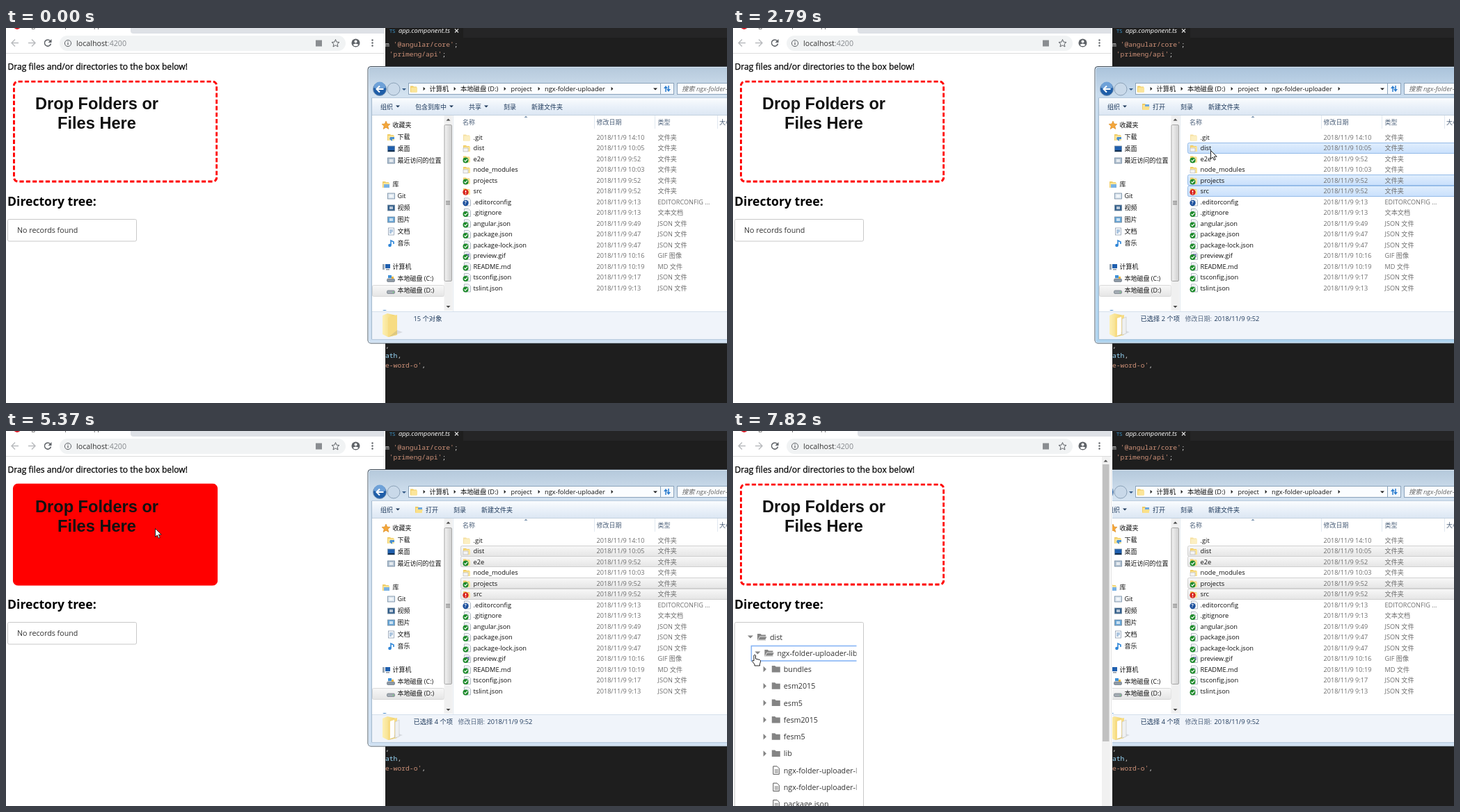
Write an HTML page that moves like this. It is 1036 by 540 pixels and loops after 8000 ms.

```html
<!DOCTYPE html>
<html lang="zh-CN">
<head>
<meta charset="utf-8">
<title>Folder upload</title>
<style>
html, body { margin: 0; width: 100%; height: 100%; overflow: hidden; background: #fff; }
svg { display: block; width: 1036px; height: 540px; }
text { font: 9.3px "Open Sans", "Noto Sans CJK SC", "Noto Sans CJK", sans-serif; white-space: pre; }
.small { font-size: 9.15px; fill: #6d6d6d; }
.nav { font-size: 9px; }
.page { font-size: 10.7px; fill: #333; }
.italic { font-style: italic; }
.code { font: 9.7px "Noto Sans Mono", monospace; }
.drop { font: bold 23.6px "Liberation Sans", Arial, sans-serif; text-anchor: middle; fill: #111; }
.zone { box-sizing: border-box; width: 380px; height: 190px; border: 4px dashed #f00; border-radius: 10px; }
.zone.over { background: #f00; border-style: solid; }
</style>
</head>
<body>
<svg id="stage" viewBox="0 0 1036 540">
  <defs>
    <linearGradient id="sel" x2="0" y2="1"><stop stop-color="#e0eefd"/><stop offset="1" stop-color="#c9e0fc"/></linearGradient>
    <linearGradient id="hover" x2="0" y2="1"><stop stop-color="#fbfdff"/><stop offset="1" stop-color="#ebf4fe"/></linearGradient>
    <linearGradient id="idle" x2="0" y2="1"><stop stop-color="#f8f8f8"/><stop offset="1" stop-color="#e5e5e5"/></linearGradient>
    <linearGradient id="bar" x2="0" y2="1"><stop stop-color="#fafcfe"/><stop offset=".5" stop-color="#eaf1f9"/><stop offset="1" stop-color="#dce7f3"/></linearGradient>
    <linearGradient id="tip" x2="0" y2="1"><stop stop-color="#fff"/><stop offset="1" stop-color="#e4e5f0"/></linearGradient>
    <linearGradient id="thumb"><stop stop-color="#f3f3f3"/><stop offset="1" stop-color="#cfcfcf"/></linearGradient>
    <linearGradient id="glassOn" x2="0" y2="1"><stop stop-color="#a9c2da"/><stop offset=".1" stop-color="#c9dcee"/><stop offset="1" stop-color="#acd2ee"/></linearGradient>
    <linearGradient id="glassOff" x2="0" y2="1"><stop stop-color="#b4c8db"/><stop offset=".1" stop-color="#d3e2f0"/><stop offset="1" stop-color="#cfe0f2"/></linearGradient>
    <linearGradient id="gold"><stop stop-color="#fdf0b4"/><stop offset="1" stop-color="#f0cf62"/></linearGradient>
    <linearGradient id="ghost" x2="0" y2="1"><stop stop-color="#f4fbfe"/><stop offset="1" stop-color="#d8eefa"/></linearGradient>
    <clipPath id="behind"><path d="M545 0H1036V540H545Z"/></clipPath>
    <clipPath id="treeClip"><path d="M12 280H177.5V540H12Z"/></clipPath>
    <clipPath id="navClip"><path d="M526 126H642V407H526Z"/></clipPath>
  </defs>
  <g id="scene"></g>
</svg>
<script>
const LOOP = 8000;

// Pointer stops: time, x, y
const pointerStops = [
  [600, 700, 440], [680, 700, 330], [760, 698, 272], [920, 697, 234], [1080, 697, 225],
  [1230, 696, 225], [1540, 694, 221], [1620, 692, 219], [1930, 691, 219], [2090, 690, 231],
  [2240, 689, 234], [2550, 689, 214], [2630, 688, 194], [2710, 686, 176], [3330, 688, 179],
  [3410, 691, 176], [3640, 691, 175], [3800, 691, 183], [4110, 692, 183], [4270, 692, 179],
  [4430, 698, 175], [4740, 600, 176], [4820, 488, 176], [4980, 320, 158], [5060, 214, 140],
  [5690, 220, 180], [5770, 232, 240], [5840, 240, 275], [6000, 246, 297], [6160, 160, 306],
  [6240, 98, 310], [6400, 60, 300], [6480, 37, 293], [6640, 25, 296], [7270, 26, 305],
  [7350, 27, 313], [7660, 31, 322]
];

// State changes, applied in order of time
const changes = [
  [0, { selected: [], bar: 'none', info: 'empty', press: false, active: false, expanded: 0, focus: -1 }],
  [1380, { press: true, active: true }],
  [1460, { selected: ['projects'] }],
  [1540, { press: false, bar: 'one', info: 'one' }],
  [2240, { press: true }],
  [2320, { selected: ['projects', 'src'] }],
  [2400, { press: false, bar: 'many', info: 2 }],
  [2710, { press: true }],
  [2790, { press: false, selected: ['dist', 'projects', 'src'] }],
  [3100, { info: 3 }],
  [3880, { tooltip: true }],
  [4030, { tooltip: false }],
  [4110, { press: true, selected: ['dist', 'e2e', 'projects', 'src'] }],
  [4270, { info: 4 }],
  [4740, { drag: true }],
  [5060, { over: true }],
  [5370, { drag: false, press: false, active: false }],
  [5450, { over: false }],
  [5530, { tree: true }],
  [5610, { behind: true }],
  [6480, { hand: true }],
  [6880, { expanded: 1, focus: 0 }],
  [7660, { focus: 1 }],
  [7740, { expanded: 2 }]
];

const files = [
  ['.git', '14:10', '文件夹', 'pale'], ['dist', '10:05', '文件夹', 'folder'], ['e2e', '9:52', '文件夹', 'folder ok'],
  ['node_modules', '10:03', '文件夹', 'folder'], ['projects', '9:52', '文件夹', 'folder ok'], ['src', '9:52', '文件夹', 'folder bad'],
  ['.editorconfig', '9:13', 'EDITORCONFIG ...', 'doc new'], ['.gitignore', '9:13', '文本文档', 'doc ok'],
  ['angular.json', '9:49', 'JSON 文件', 'doc ok'], ['package.json', '9:47', 'JSON 文件', 'doc ok'],
  ['package-lock.json', '9:47', 'JSON 文件', 'doc ok'], ['preview.gif', '10:16', 'GIF 图像', 'image ok'],
  ['README.md', '10:19', 'MD 文件', 'doc ok'], ['tsconfig.json', '9:17', 'JSON 文件', 'doc ok'], ['tslint.json', '9:13', 'JSON 文件', 'doc ok']
];
const ROW = 15.5, ROW_TOP = 149.7;

const rect = (x, y, w, h, fill, more = '') => `<rect x="${x}" y="${y}" width="${w}" height="${h}" fill="${fill}" ${more}/>`;
const circle = (x, y, r, fill, more = '') => `<circle cx="${x}" cy="${y}" r="${r}" fill="${fill}" ${more}/>`;
const shape = (d, fill, more = '') => `<path d="${d}" fill="${fill}" ${more}/>`;
const line = (d, color, width = 1) => `<path d="${d}" fill="none" stroke="${color}" stroke-width="${width}"/>`;
// y is the middle of the line of text
const text = (x, y, s, fill = '#111', more = '') => `<text x="${x}" y="${y + 3.4}" fill="${fill}" ${more}>${s}</text>`;
const small = (x, y, s) => `<text class="small" x="${x}" y="${y + 3.3}">${s}</text>`;
const at = (x, y, s) => `<g transform="translate(${x} ${y})">${s}</g>`;
const down = (x, y, fill = '#1e395b', r = 3) => shape(`M${x - r} ${y - r / 2}h${2 * r}l${-r} ${r}z`, fill);
const right = (x, y, fill = '#222', r = 2.5) => shape(`M${x - r / 2} ${y - r}v${2 * r}l${r} ${-r}z`, fill);

const folder = (x, y) => at(x, y, shape('M-5-4h4l1 1h4v8h-9z', '#f0cc63') + shape('M-4-2h9v7h-9z', '#fbe59a'));
const openIcon = (x, y) => folder(x, y) + rect(x - 1, y - 3, 6, 5, '#6fa8dc') + shape(`M${x - 5} ${y + 5}l2-5h9l-2 5z`, '#fbe08a');

function fileIcon(x, y, kind) {
  let s = '';
  if (kind === 'pale') return `<g opacity=".6">${folder(x, y)}</g>`;
  if (kind.startsWith('folder')) s = folder(x, y) + (kind === 'folder' ? rect(x - 5, y, 7, 5, '#f4f4f4', 'stroke="#b7b7b7" stroke-width=".7"') : '');
  else s = shape(`M${x - 3.5} ${y - 5.5}h6l3 3v8h-9z`, '#fff', 'stroke="#9aa5b1" stroke-width=".8"')
    + (kind.startsWith('image') ? rect(x - 2, y - 3, 6, 5, '#8e8fc0') : line(`M${x - 2} ${y - 2.5}h5M${x} ${y - .5}h4`, '#b9c6d3', .8));
  if (kind.endsWith('ok')) s += circle(x - 1.5, y + 2, 4, '#1d8a2b') + line(`M${x - 3.5} ${y + 2}l1.5 1.7 3-3.4`, '#fff', 1.2);
  if (kind.endsWith('bad')) s += circle(x - 1.5, y + 1.5, 4.2, '#d8231c') + line(`M${x - 1.5} ${y - 1}v3m0 1v1.2`, '#fff', 1.4);
  if (kind.endsWith('new')) s += circle(x - 1.5, y + 1.5, 4.2, '#1b4f9c') + `<text x="${x - 3.4}" y="${y + 4}" fill="#fff" style="font-size:7px;font-weight:700">?</text>`;
  return s;
}

function editor() {
  const code = (y, parts) => `<text class="code" x="545" y="${y}">${parts.map(([s, c]) => `<tspan fill="${c}">${s}</tspan>`).join('')}</text>`;
  const string = '#ce9178', plain = '#d4d4d4';
  return rect(543, 0, 493, 540, '#1e1e1e') + rect(657, 0, 379, 14, '#252526')
    + text(551, 4, 'TS', '#3f9fd8', 'style="font-size:7.5px"') + text(564, 4, 'app.component.ts', '#fff', 'class="italic"')
    + line('M645 1.5l5 5m0-5l-5 5', '#ddd', 1.2)
    + code(27, [['m ', plain], ["'@angular/core'", string], [';', plain]])
    + code(41, [[" 'primeng/api'", string], [';', plain]])
    + code(461, [[',', plain]]) + code(475, [['ath', '#9cdcfe'], [',', plain]]) + code(489, [["e-word-o'", string], [',', plain]]);
}

function treeRows(s) {
  const lib = 'ngx-folder-uploader-lib';
  const rows = [['dist', 0, s.expanded > 0]];
  if (s.expanded > 0) rows.push([lib, 1, s.expanded > 1]);
  if (s.expanded > 1) {
    ['bundles', 'esm2015', 'esm5', 'fesm2015', 'fesm5', 'lib'].forEach(n => rows.push([n, 2]));
    [lib + '.d.ts', lib + '.metadata.json', 'package.json'].forEach(n => rows.push([n, 2, false, true]));
  }
  ['e2e', 'projects', 'src'].forEach(n => rows.push([n, 0]));
  return rows;
}

function tree(s) {
  let y = 297, last = y, out = '';
  treeRows(s).forEach(([name, depth, open, file], i) => {
    const x = depth * 10.4, gray = '#848484';
    if (file) out += shape(`M${x + 37} ${y - 6}h5.5l3 3v8.5h-8.5z`, '#fff', 'stroke="#555"') + line(`M${x + 39} ${y - 1}h5m-5 2h5m-5 2h5`, '#555', .8);
    else {
      out += open ? down(x + 25, y - .5, gray, 4) : right(x + 25, y, gray, 4.3);
      out += shape(`M${x + 35} ${y - 5}h4.5l1.5 1.5h6v8h-12z`, gray);
      if (open) out += shape(`M${x + 36} ${y + 3.5}l2.5-4.5h10.5l-2.5 5h-11z`, gray, 'stroke="#fff" stroke-width=".8"');
    }
    out += text(x + (open ? 53 : 52), y + .5, name, '#333', 'class="page"');
    if (s.focus === i) out += rect(x + 16, y - 10.5, 170, 21.5, 'none', 'stroke="#86b4f5" stroke-width="1.6"');
    last = y;
    y += open ? 23 : 24.3;
  });
  const scroll = s.expanded ? 13 : 0;
  if (scroll) out += rect(13, last + 11.5, 165, 12, '#f1f1f1') + rect(25, last + 13.5, 128, 8, '#c1c1c1')
    + right(172, last + 17.5, '#505050', 3) + shape(`M17 ${last + 17.5}l3-3v6z`, '#a3a3a3');
  return rect(2.5, 275.5, 185, last - 254 + scroll, '#fff', 'rx="2" stroke="#c8c8c8"') + `<g clip-path="url(#treeClip)">${out}</g>`;
}

const dropZone = over => `<foreignObject width="380" height="190" transform="translate(9.8 75.4) scale(.775)">
  <div xmlns="http://www.w3.org/1999/xhtml" class="zone${over ? ' over' : ''}"></div></foreignObject>`;

function browser(s) {
  const icon = '#5f6368', pale = '#b9bbbe';
  let out = rect(0, 0, 545, 540, '#fff') + rect(0, 0, 543, 8, '#dee1e6') + shape('M0 0H179V4q0 4 4 4H0Z', '#fff')
    + circle(16, -3, 5, '#dd1b26') + text(31, -3.5, 'ngx-folder-uploader-app', '#444')
    + rect(77, 11, 411, 22, '#f1f3f4', 'rx="11"')
    + line('M18 21.5H8M13 16.5l-5 5 5 5M32 21.5h10M37 16.5l5 5-5 5', pale, 1.4)
    + line('M63.5 18.5a4.6 4.6 0 1 0 1 4', icon, 1.5) + shape('M65.5 16v5h-5z', icon)
    + circle(89, 22, 4.6, 'none', `stroke="${icon}"`) + line('M89 21v3.5M89 19v1', icon, 1.2)
    + '<text class="page" x="101" y="25.5">localhost<tspan fill="#85888c">:4200</tspan></text>'
    + rect(445, 17.5, 9, 9, '#8a8d91')
    + shape('M473.5 16.5l1.5 3.7 4 .3-3 2.6 1 3.9-3.5-2.1-3.5 2.1 1-3.9-3-2.6 4-.3z', 'none', `stroke="${icon}"`)
    + circle(502.5, 21.5, 6, icon) + circle(502.5, 19.5, 2, '#fff') + shape('M498.5 24q4-3 8 0l-2 2h-4z', '#fff')
    + [17.5, 21.5, 25.5].map(y => circle(526.5, y, 1.2, icon)).join('')
    + rect(0, 36, 543, 1, '#dcdcdc') + rect(543, 0, 1, 540, '#e4e4e4')
    + text(2.5, 56.7, 'Drag files and/or directories to the box below!', '#000', 'style="font-size:12.15px" stroke="#000" stroke-width=".25"');
  out += dropZone(s.over)
    + '<text class="drop" x="130.5" y="116.5">Drop Folders or</text><text class="drop" x="130.5" y="144.5">Files Here</text>'
    + text(2, 252.5, 'Directory tree:', '#000', 'style="font-size:17.6px;font-weight:700"');
  out += s.tree ? tree(s) : rect(2.5, 275.5, 185, 31.5, '#fff', 'rx="2" stroke="#c8c8c8"') + text(16, 291.5, 'No records found', '#333', 'class="page"');
  if (s.expanded > 1) out += rect(530, 37, 12, 503, '#f1f1f1') + rect(531, 48, 9.5, 399, '#c1c1c1') + shape('M532.5 44.5h6l-3-3z', '#505050');
  return out;
}

function commands(kind) {
  const ink = '#1e395b';
  const item = (x, s, arrow) => text(x, 113.5, s, ink, 'class="nav"') + (arrow ? down(arrow, 113, ink) : '');
  const shift = kind === 'one' ? 55 : 0;
  let out = item(538, '组织', 563);
  if (kind !== 'none') out += openIcon(593, 113) + item(603, '打开');
  if (kind === 'many') return out + item(643, '刻录') + item(683, '新建文件夹');
  return out + item(588 + shift, '包含到库中', 640 + shift) + item(665 + shift, '共享', 690 + shift)
    + item(715 + shift, '刻录') + item(755 + shift, '新建文件夹');
}

function navIcon(label, color, y) {
  if (label === '音乐') return line(`M553 ${y + 3}v-7l4 2v3`, color, 1.6) + circle(551.5, y + 3, 2.3, color);
  if (label === '下载') return folder(553, y) + shape(`M552 ${y}h6v3h-3v3l-4-3z`, color);
  if (label === '文档') return rect(549.5, y - 5, 8, 10, '#fff', 'stroke="#8a9bb0" stroke-width=".8"') + line(`M551 ${y - 2}h5m-5 2h5m-5 2h3`, '#5b8cc0');
  if (label.includes(':')) return rect(547.5, y, 11, 4.5, color, 'rx="1.5" stroke="#6d7680" stroke-width=".7"')
    + (label.includes('C:') ? rect(549, y - 5, 5, 4, '#3f91d8') + rect(554, y - 3, 3, 3, '#f0b53a') : circle(556.5, y + 2.5, .8, '#5d5'));
  return rect(548.5, y - 4, 10, 8, color, 'stroke="#70889f" stroke-width=".8"')
    + (label === '桌面' ? rect(549, y + 2, 9, 2, '#15304f') : rect(551, y - 2, 5, 4, '#fff', 'opacity=".65"'));
}

function navigation() {
  const groups = [
    [140, '收藏夹', [['下载', '#4a90d0'], ['桌面', '#1f5fae'], ['最近访问的位置', '#b4c3d2']]],
    [225, '库', [['Git', '#dce6f0'], ['视频', '#34608c'], ['图片', '#69a7d8'], ['文档', '#e6eef6'], ['音乐', '#2f86d8']]],
    [344, '计算机', [['本地磁盘 (C:)', '#8c99a6'], ['本地磁盘 (D:)', '#a4acb4']]]
  ];
  let out = rect(526.5, 370.5, 103, 16, 'url(#idle)', 'rx="2" stroke="#d9d9d9"');
  out += shape('M546 134l1.8 4 4.2.4-3.2 2.8 1 4.3-3.8-2.3-3.8 2.3 1-4.3-3.2-2.8 4.2-.4z', '#f3a63b', 'stroke="#d98517" stroke-width=".6"')
    + folder(546, 225) + rect(543, 225, 8, 5, '#79b2e4')
    + rect(541, 340, 3, 8, '#9aa7b3') + rect(545, 340, 7, 6, '#1f5fae') + rect(546, 347, 5, 1.5, '#8793a0')
    + circle(544, 410, 4, '#3b82c8');
  for (const [y, title, items] of groups) {
    out += text(555.5, y, title, '#111', 'class="nav"');
    items.forEach(([label, color], i) => {
      const cy = y + 17 * (i + 1);
      out += navIcon(label, color, cy) + text(562.5, cy, label, '#111', 'class="nav"');
    });
  }
  out += rect(629.5, 126, 12, 282, '#f0f0f0') + rect(630, 139.5, 10.5, 225, 'url(#thumb)', 'rx="1.5" stroke="#a6a6a6"')
    + line('M632 249.5h6m-6 2.2h6m-6 2.2h6', '#777') + shape('M632.5 133.5h6l-3-3z', '#444') + down(635.5, 401.5, '#444');
  return `<g clip-path="url(#navClip)">${out}</g>`;
}

function fileList(s, hover) {
  let out = line('M845.5 126v19M932.5 126v19M1022.5 126v19', '#e1e8f0') + shape('M744.5 129h5l-2.5-2.5z', '#7d96b0');
  [[656, '名称'], [848.5, '修改日期'], [936.5, '类型'], [1025, '大小']].forEach(([x, s]) => out += text(x, 136, s, '#4c607a', 'class="nav"'));
  files.forEach(([name, time, type, icon], i) => {
    const y = ROW_TOP + ROW * (i + .5), picked = s.selected.includes(name);
    const look = picked ? (s.active ? ['sel', '#94bbe8'] : ['idle', '#d0d0d0']) : i === hover ? ['hover', '#b8d6fb'] : null;
    if (look) out += rect(653.5, Math.round(y - 8) + .5, 400, 15, `url(#${look[0]})`, `rx="2" stroke="${look[1]}"`);
    out += fileIcon(662, y, icon) + text(671.5, y, name) + small(848.5, y, '2018/11/9 ' + time) + small(936.5, y, type);
  });
  return out;
}

function details(s) {
  const dark = '#1e395b', label = '#5a6d86';
  let out = rect(526, 408, 510, 40, '#f0f4fa') + rect(526, 408, 510, 1, '#d5e0ec');
  out += shape('M541 414l7-3 13 3v28l-12 3-8-4z', 'url(#gold)') + shape('M549 417l13-4v29l-13 3z', '#f7dc83')
    + shape('M562 435l8 3-20 7z', '#777', 'opacity=".2"');
  if (s.info === 'empty') return out + text(585.5, 419, '15 个对象', dark);
  out += shape('M552 418l6-2v25l-6 2z', '#fff') + shape('M559 419l6-3v24l-6 2z', '#eef0f2', 'stroke="#c5c5c5" stroke-width=".6"');
  const modified = (x, time) => text(x, 419, '修改日期:', label, 'class="nav"') + text(x + 42, 419, '2018/11/9 ' + time, dark);
  if (s.info === 'one') return out + text(583.5, 419, 'projects', dark) + modified(624, '9:52') + text(583.5, 432.5, '文件夹', label, 'class="nav"');
  return out + text(585.5, 419, `已选择 ${s.info} 个项`, dark) + modified(649.5, s.info === 3 ? '10:05' : '9:52');
}

function explorer(s, hover) {
  let out = rect(520, 55.5, 530, 398.5, `url(#${s.active ? 'glassOn' : 'glassOff'})`, 'rx="4" stroke="#3f4a55"')
    + line('M521 453V60q0-3.5 3.5-3.5H1036M521 453H1036', '#eaf3fa', .8)
    + rect(525.5, 101, 520, 347, '#fff', 'stroke="#a3b8cc"') + rect(526, 101, 510, 24, 'url(#bar)') + rect(526, 125, 510, 1, '#c3d1df');
  out += circle(557, 88, 9, '#c9d9e9', 'stroke="#8ca2b8"') + circle(537, 88, 9.5, '#1f5ea8', 'stroke="#7f99b5"') + shape('M528.5 86a8.5 8.5 0 0 1 17 0q-8.5 3-17 0z', '#6ea1d8')
    + line('M542.5 88H533M537 83.5l-4.5 4.5 4.5 4.5', '#fff', 2) + down(572, 88.5, '#345a86');
  out += rect(578.5, 79.5, 362, 16, '#fbfdff', 'stroke="#8ba3bb"') + rect(940.5, 79.5, 19, 16, '#f3f8fd', 'stroke="#8ba3bb"')
    + rect(964.5, 79.5, 90, 16, '#fbfdff', 'stroke="#8ba3bb"') + folder(586, 87.5)
    + [601, 645, 717, 766, 871].map(x => right(x, 87.5, '#222', 2.8)).join('') + down(933, 88, '#222')
    + [[608.5, '计算机'], [653, '本地磁盘 (D:)'], [725.5, 'project'], [774, 'ngx-folder-uploader']].map(([x, t]) => text(x, 87.5, t)).join('')
    + line('M948 92v-6M952 83v6', '#2f7fd0', 1.5) + shape('M945 87h6l-3-4zM949 88h6l-3 4z', '#2f7fd0')
    + text(971, 88, '搜索 ngx-folder-uploader', '#666', 'class="italic"');
  out += commands(s.bar) + navigation() + rect(642, 126, 1, 282, '#e3e9f0') + fileList(s, hover) + details(s);
  return `<g ${s.behind ? 'clip-path="url(#behind)"' : ''}>${out}</g>`;
}

function tooltip() {
  return rect(695, 200, 181, 51, '#000', 'opacity=".2" rx="2"') + rect(692.5, 197.5, 181, 51, 'url(#tip)', 'rx="2" stroke="#767676"')
    + ['创建日期: 2018/11/9 9:52', '大小: 1.43 KB', '文件夹: src', '文件: protractor.conf.js, tsconfig.e2e.json']
      .map((t, i) => text(695.5, 204.5 + i * 12.6, t, '#575757')).join('');
}

function dragImage() {
  return rect(-38, -69, 76, 77, 'url(#ghost)', 'opacity=".9" rx="2"') + line('M-37 8.5H38', '#b9cfdc')
    + rect(-5.5, -37.5, 11, 12, '#1f62c0', 'rx="1"') + text(-2.7, -31.5, '4', '#fff', 'style="font-weight:700"')
    + rect(9.5, 9.5, 36, 14, '#fcfdff', 'rx="2" stroke="#8a8a8a"')
    + line('M12.5 16.5h8M16.5 12.5v8', '#1f6fc4', 2.6) + text(23.5, 16.7, '复制', '#1c3fb0', 'class="nav"');
}

function pointer(s, x, y) {
  const edge = 'stroke="#222" stroke-linejoin="round"';
  const arrow = shape('M.5 .5V12.5l2.8-2.5 2 4.3 1.9-.9-1.9-4.2h3.900z', '#fff', edge);
  const hand = shape('M-1 1q1.5-1.5 2.5 0v5l6 1.5q1.5.5 1 3l-1 3v2.5h-7.5v-2l-3.5-4.5q0-2 2.5-.5z', '#fff', edge);
  return at(x, y, (s.drag ? dragImage() : '') + (s.press ? circle(.8, .8, 8.8, '#f3e946', 'opacity=".8"') : '') + (s.hand ? hand : arrow));
}

function render(t) {
  const s = Object.assign({}, ...changes.filter(c => c[0] <= t).map(c => c[1]));
  const [, x, y] = pointerStops.filter(p => p[0] <= t).pop() || [];
  const inList = x > 654 && !s.drag;
  const hover = inList ? Math.floor((y - ROW_TOP) / ROW) : -1;
  return editor() + browser(s) + explorer(s, hover) + (s.tooltip ? tooltip() : '') + (x ? pointer(s, x, y) : '');
}

const scene = document.getElementById('scene');
const moments = [...new Set([...changes, ...pointerStops].map(e => e[0]))].sort((a, b) => a - b);
const start = performance.now();
let shown = -1;

function tick() {
  const t = (performance.now() - start) % LOOP;
  const moment = moments.filter(m => m <= t).pop();
  if (moment !== shown) {
    scene.innerHTML = render(moment);
    shown = moment;
  }
  requestAnimationFrame(tick);
}
tick();
</script>
</body>
</html>
```
